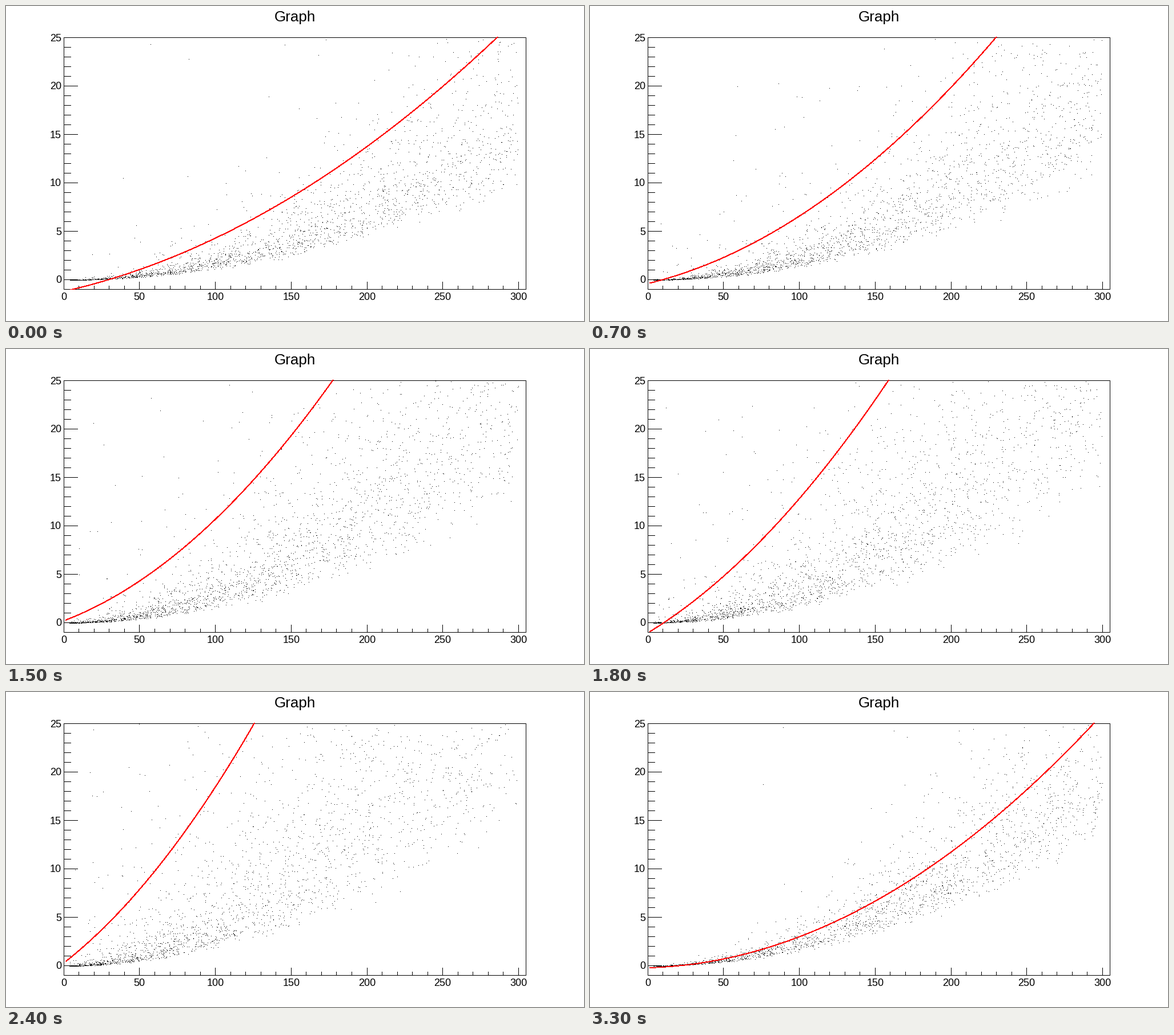
Write a matplotlib script that moves like this. It is 1012 px wide and 553 px high and loops after 3400 ms.

```python
import numpy as np
import matplotlib.pyplot as plt
from matplotlib.animation import FuncAnimation
from matplotlib.patches import Rectangle

W, H, DPI = 1012, 553, 64
PX = 72 / DPI  # one pixel in points
FRAMES, INTERVAL, RESET = 34, 100, 25
XMAX, YMIN, YMAX = 305, -1, 25
X0, X1, Y0, Y1 = 0.1 * W, 0.9 * W, 0.9 * H, 0.1 * H
LEFT, RIGHT, BOTTOM, TOP = int(X0), int(X1), int(Y0), int(Y1)
GRID = (np.arange(100) + 0.5) * XMAX / 100


def px(x):
    return X0 + (X1 - X0) * np.asarray(x) / XMAX


def py(y):
    return Y0 + (Y1 - Y0) * (np.asarray(y) - YMIN) / (YMAX - YMIN)


def curve(i):
    """Parabola through its heights at x = 0, 100 and 200."""
    if i < RESET:
        h0 = -0.45 - 0.75 * np.cos(2 * np.pi * i / 9.5)
        h1, h2 = 4.3 * np.exp(0.0607 * i), 13.75 * np.exp(0.0525 * i)
    else:
        k = i - 28
        h0 = -0.15 - 0.01 * k
        h1, h2 = 2.45 * np.exp(0.0405 * k), 9.75 * np.exp(0.037 * k)
    c = (h2 - 2 * h1 + h0) / 2
    b = h1 - h0 - c
    u = GRID / 100
    return h0 + b * u + c * u**2


def cloud(i):
    """Quadratic trend with skewed scatter and a long upper tail."""
    if i < RESET:
        u = i / (RESET - 1)
        median, spread = 1.9e-4 * np.exp(0.033 * i), 0.165 + 0.08 * u
        share, scale, n = 0.06 + 0.28 * u, 1.6 + 0.7 * u, int(2100 + 1050 * u)
    else:
        k = i - 28
        median, spread = 2.08e-4 * np.exp(0.029 * k), 0.14
        share, scale, n = 0.008 + 0.0025 * k, 1 + 0.04 * k, 1700 + 60 * k
    rng = np.random.default_rng(100 + i)
    x = rng.uniform(4, 300, n)
    z = spread * (rng.gamma(5, 1, n) - 4.67)
    z += (rng.random(n) < share) * rng.exponential(scale, n)
    y = median * x**2 * np.exp(z)
    keep = y < YMAX
    return np.column_stack([px(x[keep]), py(y[keep])])


def rule(x0, y0, x1, y1):
    ax.plot([x0 + 0.5, x1 + 0.5], [y0 + 0.5, y1 + 0.5], color="black",
            lw=PX, snap=False, solid_capstyle="projecting", zorder=2)


def label(x, y, text, size=18, ha="center"):
    ax.text(x, y, text, fontsize=size * PX, ha=ha, va="baseline", color="black")


plt.rcParams["font.family"] = "Liberation Sans"
fig = plt.figure(figsize=(W / DPI, H / DPI), dpi=DPI, facecolor="white")
ax = fig.add_axes([0, 0, 1, 1])
ax.set_xlim(0, W)
ax.set_ylim(H, 0)
ax.axis("off")

for y in (TOP, BOTTOM):
    rule(LEFT, y, RIGHT, y)
for x in (LEFT, RIGHT):
    rule(x, TOP, x, BOTTOM)

for v in range(YMAX + 1):
    y = int(py(v) + 1e-6)
    rule(LEFT, y, LEFT + (24 if v % 5 == 0 else 12), y)
    if v % 5 == 0:
        label(97, y + 6.5, str(v), ha="right")

for v in range(0, 301, 10):
    x = int(px(v))
    rule(x, BOTTOM, x, BOTTOM - (13 if v % 50 == 0 else 6))
    if v % 50 == 0:
        label(x + 0.5, 516, str(v))

label(506, 27, "Graph", size=26)

dots = ax.scatter([], [], s=PX**2, marker="s", color="black", linewidths=0,
                  snap=False, zorder=3)
fit, = ax.plot([], [], color="#ff0000", lw=0.9 * PX, antialiased=False, zorder=4)
fit.set_clip_path(Rectangle((LEFT, TOP - 1), RIGHT - LEFT + 1, BOTTOM - TOP + 2,
                            transform=ax.transData))


def update(i):
    dots.set_offsets(np.floor(cloud(i)) + 0.5)
    fit.set_data(px(GRID), py(curve(i)))
    return dots, fit


anim = FuncAnimation(fig, update, frames=FRAMES, interval=INTERVAL,
                     init_func=lambda: update(0), repeat=True, repeat_delay=0,
                     blit=False)
plt.show()
```
